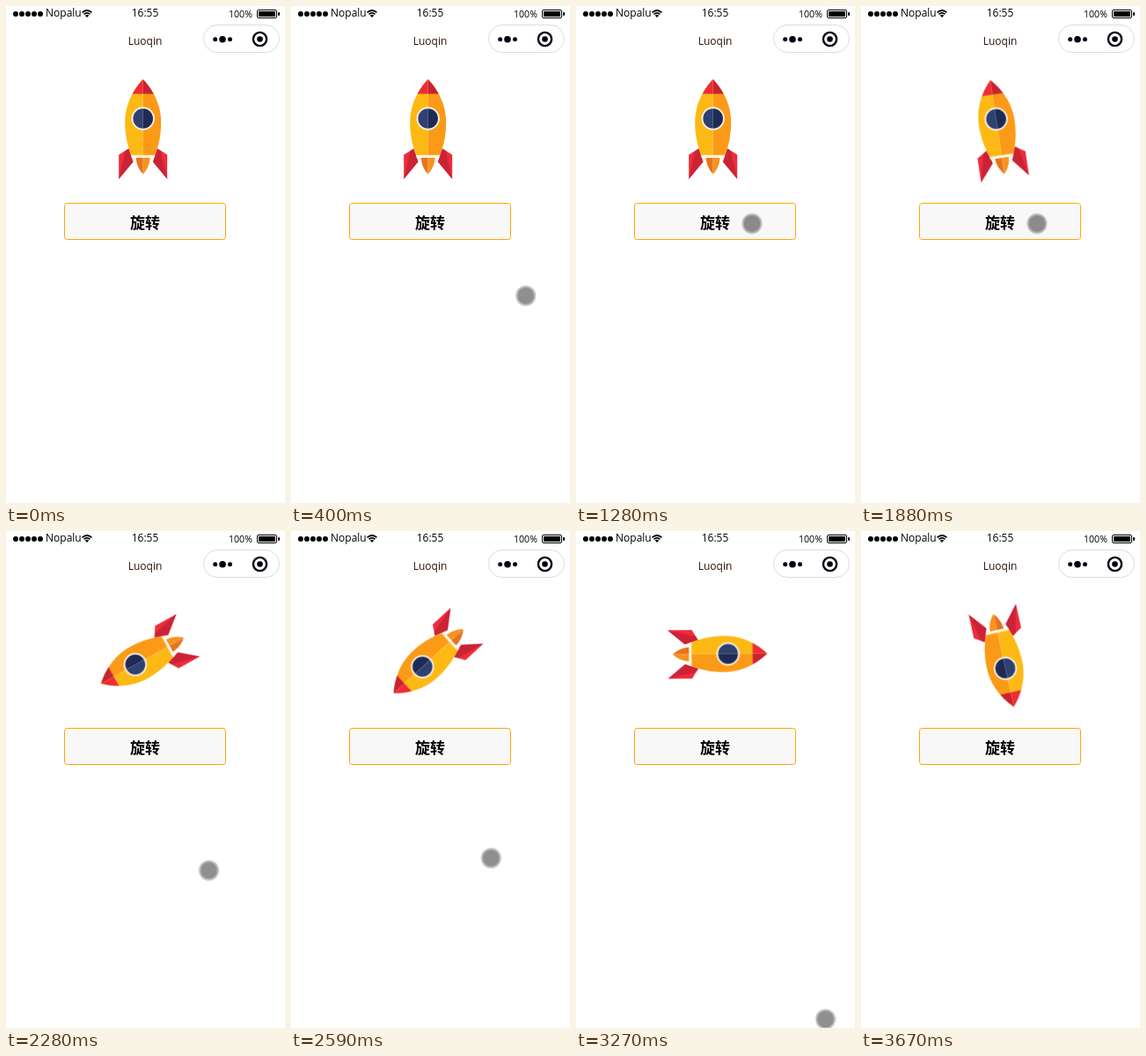
An HTML page that plays this animation: 317x563 px, repeating every 3720 ms.

```html
<!DOCTYPE html>
<html lang="zh">
<head>
<meta charset="utf-8">
<title>旋转</title>
<style>
  html, body { margin: 0; width: 100%; height: 100%; overflow: hidden; background: #fff; }
  svg { display: block; }
  text { font-family: "Open Sans", "Noto Sans", sans-serif; font-size: 12px; }
  #rocket { transform-box: view-box; transform-origin: 158.3px 142px; }
  #label { font: 700 17px "Noto Sans CJK SC", "Noto Sans CJK", sans-serif; }
  #face { fill: #f8f8f8; stroke: #ffa500; }
  .pressed #face { fill: #dedede; }
  .pressed #label { fill-opacity: .6; }
</style>
</head>
<body>
<svg width="317" height="563" viewBox="0 0 317 563">
  <defs>
    <!-- left halves; the right ones are mirrored on x = 0 -->
    <path id="hull" d="M0 83C-7.700 91 -20.500 108 -20.500 132C-20.500 147 -17.300 160 -13.300 169H0Z"/>
    <path id="flame" d="M-8 172C-7.300 180 -4.300 186 0 190.500V172Z"/>
    <path id="pane" d="M0 116.200A11.300 11.300 0 0 0 0 138.800Z"/>
    <g id="fin">
      <path d="M-16.300 161.500L-11.300 176.500L-27.500 196V168.500Z" fill="#ee2b3b"/>
      <path d="M-16.300 161.500L-11.300 176.500L-27.500 196L-20 164Z" fill="#cb2336"/>
    </g>
    <clipPath id="tip"><rect x="-30" y="80" width="60" height="19.500"/></clipPath>
  </defs>

  <!-- status bar -->
  <g id="signal"></g>
  <text x="45" y="12.300">Nopalu</text>
  <path d="M86.500 7.300Q92 2.700 97.500 7.300M88.500 9.400Q92 6.400 95.500 9.400" fill="none" stroke="#000" stroke-width="1.700"/>
  <path d="M89.800 10.700Q92 9 94.200 10.700L92 13Z"/>
  <text x="158" y="12.300" text-anchor="middle">16:55</text>
  <text x="253" y="13" style="font-size:10.600px">100%</text>
  <rect x="285.500" y="4.500" width="22" height="9" rx="1.500" fill="none" stroke="#000"/>
  <rect x="287" y="6" width="19" height="6"/>
  <rect x="309" y="7" width="2" height="4" rx="1"/>

  <!-- title bar -->
  <text x="158" y="44" text-anchor="middle" fill="#2c1408">Luoqin</text>
  <rect x="224.500" y="21.500" width="86" height="31" rx="15.500" fill="#fff" stroke="#dcdcdc"/>
  <g fill="#000010">
    <circle cx="237.700" cy="37.700" r="2.500"/>
    <circle cx="246" cy="37.700" r="3.800"/>
    <circle cx="254.500" cy="37.700" r="2.500"/>
    <circle cx="288.500" cy="37.500" r="3.300"/>
    <circle cx="288.500" cy="37.500" r="7.600" fill="none" stroke="#000010" stroke-width="2.400"/>
  </g>

  <g id="rocket">
    <g transform="translate(155.700)">
      <use href="#fin"/>
      <use href="#flame" fill="#e8731d"/>
      <use href="#hull" fill="#fdb913"/>
      <use href="#hull" fill="#ee2b3b" clip-path="url(#tip)"/>
      <g transform="scale(-1 1)">
        <use href="#fin"/>
        <use href="#flame" fill="#f7931e"/>
        <use href="#hull" fill="#fb9a17"/>
        <use href="#hull" fill="#c92235" clip-path="url(#tip)"/>
      </g>
      <rect x="-13.300" y="168.800" width="26.600" height="2.700" fill="#fdf0d8"/>
      <circle cy="127.500" r="13.200" fill="#f6f0e6"/>
      <use href="#pane" fill="#2e4171"/>
      <use href="#pane" fill="#1f2b54" transform="scale(-1 1)"/>
    </g>
  </g>

  <g id="button">
    <rect id="face" x="66.500" y="223.500" width="183" height="41" rx="3"/>
    <text id="label" x="158" y="251.500" text-anchor="middle">旋转</text>
  </g>

  <g id="pointer">
    <circle r="11.500" fill="#000" fill-opacity=".25"/>
    <circle r="9.500" fill="#000" fill-opacity=".25"/>
  </g>
</svg>
<script>
const LOOP = 3720, SPIN = 740, PRESS = 140;
const taps = [1730, 2850];
const $ = id => document.getElementById(id);

$('signal').innerHTML = [0, 1, 2, 3, 4]
  .map(i => `<circle cx="${11 + 7 * i}" cy="9" r="3"/>`).join('');

// Each move is { from, to, pose }; the pose is held until the next move begins.
function track(id, rest, moves, easing) {
  const frames = [{ offset: 0, transform: rest }];
  let pose = rest;
  for (const move of moves) {
    frames.push({ offset: move.from / LOOP, transform: pose, easing });
    pose = move.pose;
    frames.push({ offset: move.to / LOOP, transform: pose });
  }
  frames.push({ offset: 1, transform: pose });
  const anim = $(id).animate(frames, { duration: LOOP, fill: 'both' });
  anim.pause();
  return anim;
}

const at = (x, y) => `translate(${x}px, ${y}px)`;
const glide = (from, to, x, y) => ({ from, to, pose: at(x, y) });
const spin = (tap, angle) => ({ from: tap + 93, to: tap + 93 + SPIN, pose: `rotate(${angle}deg)` });

const tracks = [
  track('pointer', at(296, 466), [
    glide(50, 160, 264, 321),
    glide(300, 860, 305, 430),
    glide(860, 1280, 200, 246.5),
    glide(1900, 2260, 230.5, 384.5),
    glide(2500, 2890, 202.5, 259.5),
    glide(2980, 3268, 283.5, 553)
  ], 'ease-in-out'),
  track('rocket', 'rotate(0deg)', [spin(taps[0], -132.5), spin(taps[1], 167.5)], 'ease')
];

const within = (t, a, b) => t >= a && t < b;
const start = performance.now();

function draw() {
  const t = (performance.now() - start) % LOOP;
  tracks.forEach(anim => { anim.currentTime = t; });
  $('pointer').style.visibility = within(t, 50, 3420) ? 'visible' : 'hidden';
  $('button').classList.toggle('pressed', taps.some(tap => within(t, tap, tap + PRESS)));
  requestAnimationFrame(draw);
}
draw();
</script>
</body>
</html>
```
